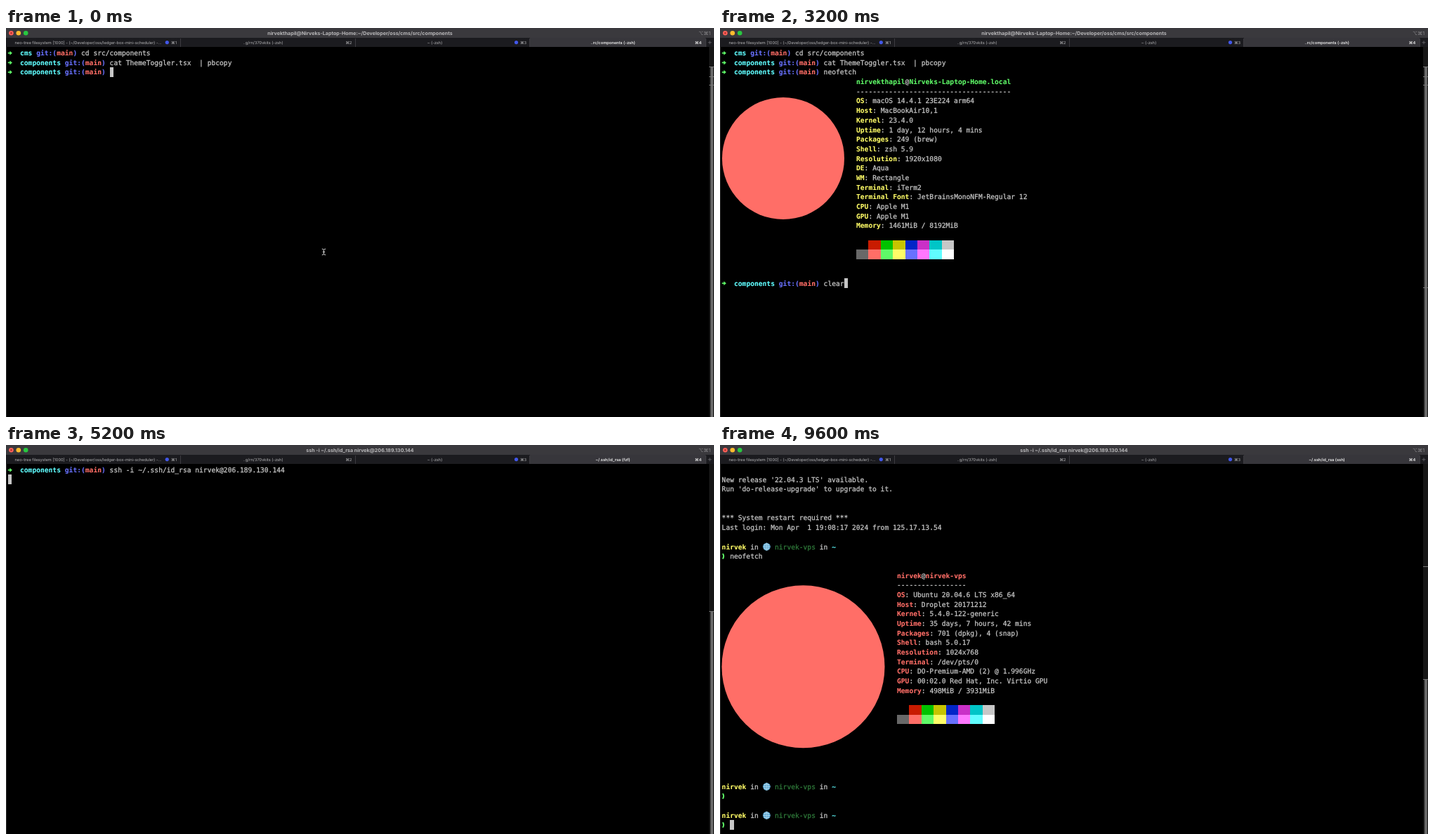
These frames come from a looping animation (1008 px wide and 555 px high, 9800 ms). An HTML page:

```html
<!DOCTYPE html>
<html lang="en">
<head>
<meta charset="utf-8">
<title>Terminal session</title>
<style>
html, body { margin: 0; width: 100%; height: 100%; overflow: hidden; background: #000; }
svg { display: block; width: 100%; height: 100%; }
text { white-space: pre; text-rendering: geometricPrecision; }
rect { shape-rendering: crispEdges; }
.term text { font: 9.634px "DejaVu Sans Mono", monospace; stroke-width: .26; }
.term .b { font-weight: 700; stroke-width: .1; }
.bar text { font: 5.7px Inter, "DejaVu Sans", sans-serif; fill: #b4b4b6; text-anchor: middle; }
.bar .on { font-weight: 600; fill: #f0f0f0; }
.bar .title { font-size: 7.1px; font-weight: 700; fill: #b9b8ba; }
.bar .key { font-size: 7px; fill: #8b8a8d; }
</style>
</head>
<body>
<svg viewBox="0 0 1008 555" preserveAspectRatio="none">
  <rect width="1008" height="555"/>
  <g class="term" id="term"></g>
  <g class="bar" id="bar"></g>
</svg>
<script>
const LOOP = 9800, STEP = 200;
const CW = 5.8, LH = 13.69, LEFT = 2.6, TOP = 28.8;
const FG = "#c7c7c7";

const USER = "nirvek", VPS = USER + "-vps", HOST = "Nirveks-Laptop-Home";
const LOGIN = USER + "thapil@" + HOST;
const IP = "206.189.130.144";
const SSH = `ssh -i ~/.ssh/id_rsa ${USER}@${IP}`;

// Style letters follow "^" in a line; capitals are bold.
const COLORS = {
  w: FG, W: "#ffffff", G: "#5ffa68", Y: "#fffc67", R: "#ff6e67", B: "#6871ff", C: "#60fdff",
  h: "#87af87", H: "#afd7af", i: "#a5a078", d: "#2f7a3a", P: "#d7225f", Q: "#87afd7"
};
const NORMAL = ["#000000", "#c91b00", "#00c200", "#c7c400", "#0225c7", "#ca30c7", "#00c5c7", "#c7c7c7"];
const BRIGHT = ["#686868", "#ff6e67", "#5ffa68", "#fffc67", "#6871ff", "#ff77ff", "#60fdff", "#ffffff"];

const colX = c => LEFT + c * CW;
const rowY = r => TOP + r * LH;
const rect = (x, y, w, h, fill) =>
  `<rect x="${x}" y="${y}" width="${w}" height="${h}" fill="${fill}"/>`;
const circle = (x, y, r, fill) => `<circle cx="${x}" cy="${y}" r="${r}" fill="${fill}"/>`;
const stroke = (d, color, w) => `<path d="${d}" fill="none" stroke="${color}" stroke-width="${w}"/>`;
const label = (x, y, s, cls = "") => `<text x="${x}" y="${y}" class="${cls}">${s}</text>`;
const cells = (c, r, n, fill, rows = 1) => rect(colX(c), rowY(r), n * CW, rows * LH, fill);

const ICONS = {
  "➜": (x, y, color) => stroke(`M${x + .2} ${y + 6.9}h4`, color, 1.7) +
    `<path d="M${x + 2.8} ${y + 3.9}l3.5 3l-3.5 3z" fill="${color}"/>`,
  "❯": (x, y, color) => stroke(`M${x + 1.3} ${y + 3}q2.6 3.7 0 7.5`, color, 1.9),
  "◍": (x, y) => {
    const cx = x + 5.8, cy = y + 6.8;
    return circle(cx, cy, 5.4, "#4d9fce") +
      stroke(`M${cx - 5.2} ${cy}h10.4M${cx} ${cy - 5.2}v10.4M${cx - 4.4} ${cy - 2.8}h8.8M${cx - 4.4} ${cy + 2.8}h8.8`, "#d5ecf6", .6) +
      `<ellipse cx="${cx}" cy="${cy}" rx="2.7" ry="5.2" fill="none" stroke="#d5ecf6" stroke-width=".6"/>`;
  }
};

function drawLine(line, row) {
  let out = "", col = 0;
  const y = rowY(row);
  for (const part of ("^w" + line).split("^").slice(1)) {
    const style = part[0], color = COLORS[style];
    let run = "";
    [...part.slice(1)].forEach((ch, i) => {
      const icon = ICONS[ch];
      if (icon) out += icon(colX(col + i), y, color);
      run += icon ? " " : ch;
    });
    const body = run.trimStart();
    if (body) {
      const x = colX(col + run.length - body.length);
      const bold = style < "a" ? ` class="b"` : "";
      out += `<text x="${x.toFixed(2)}" y="${(y + 10.2).toFixed(2)}" fill="${color}" stroke="${color}"${bold}>${body}</text>`;
    }
    col += run.length;
  }
  return out;
}

const prompt = (cmd, dir = "components") => `^G➜  ^C${dir} ^Bgit:(^Rmain^B)^w ${cmd}`;
const vpsPrompt = cmd => [`^Y${USER}^w in ◍  ^d${VPS}^w in ^C~`, `^G❯^w ${cmd}`];
const typed = (cmd, k, steps) =>
  cmd.slice(0, Math.ceil(Math.max(0, Math.min(1, k / steps)) * cmd.length));
const info = (style, rows) => rows.map(s => s.replace(/^[^:]+/, key => `^${style}${key}^w`));

function palette(col, row) {
  return [NORMAL, BRIGHT].map((set, j) =>
    set.map((fill, i) => cells(col + i * 3, row + j, 3, fill)).join("")).join("");
}

const MAC_INFO = [`^G${LOGIN.replace("@", "^w@^G")}.local`, "-".repeat(38),
  ...info("Y", ["OS: macOS 14.4.1 23E224 arm64", "Host: MacBookAir10,1", "Kernel: 23.4.0",
    "Uptime: 1 day, 12 hours, 4 mins", "Packages: 249 (brew)", "Shell: zsh 5.9",
    "Resolution: 1920x1080", "DE: Aqua", "WM: Rectangle", "Terminal: iTerm2",
    "Terminal Font: JetBrainsMonoNFM-Regular 12", "CPU: Apple M1", "GPU: Apple M1",
    "Memory: 1461MiB / 8192MiB"])];

const VPS_INFO = [`^R${USER}^w@^R${VPS}`, "-".repeat(17),
  ...info("R", ["OS: Ubuntu 20.04.6 LTS x86_64", "Host: Droplet 20171212",
    "Kernel: 5.4.0-122-generic", "Uptime: 35 days, 7 hours, 42 mins",
    "Packages: 701 (dpkg), 4 (snap)", "Shell: bash 5.0.17", "Resolution: 1024x768",
    "Terminal: /dev/pts/0", "CPU: DO-Premium-AMD (2) @ 1.996GHz",
    "GPU: 00:02.0 Red Hat, Inc. Virtio GPU", "Memory: 498MiB / 3931MiB"])];

const stat = (key, val) => `  ${key}:`.padEnd(36) + val;
const WELCOME = ["Welcome to Ubuntu 20.04.6 LTS (GNU/Linux 5.4.0-122-generic x86_64)", "",
  " * Documentation:  https://help.ubuntu.com",
  " * Management:     https://landscape.canonical.com",
  " * Support:        https://ubuntu.com/pro", "",
  "  System information as of Mon Apr  1 23:12:59 UTC 2024", "",
  stat("System load", "0.0"), stat("Usage of /", "10.9% of 77.35GB"),
  stat("Memory usage", "18%"), stat("Swap usage", "0%"), stat("Processes", "140"),
  stat("Users logged in", "0"), stat("IPv4 address for br-1675ef4d2a72", "172.22.0.1"),
  stat("IPv4 address for docker0", "172.17.0.1"), stat("IPv4 address for eth0", IP),
  stat("IPv4 address for eth0", "10.47.0.5"), stat("IPv4 address for eth1", "10.122.0.2"), "",
  "Expanded Security Maintenance for Applications is not enabled.", "",
  "15 updates can be applied immediately.",
  "To see these additional updates run: apt list --upgradable", "",
  "3 additional security updates can be applied with ESM Apps.",
  "Learn more about enabling ESM Apps service at https://ubuntu.com/esm", "",
  "New release '22.04.3 LTS' available.",
  "Run 'do-release-upgrade' to upgrade to it.", "", "",
  "*** System restart required ***",
  "Last login: Mon Apr  1 19:08:17 2024 from 125.17.13.54", ""];

const HISTORY = [
  ` 3996  ssh -i .ssh/id_rsa root@${IP}`,
  ` 4006  ssh -i .ssh/id_rsa ${USER}@${IP}`,
  ` 4007  ssh -i .ssh/id_rsa_vps ${USER}@${IP}`,
  ` 4008  ssh -i .ssh/id_rsa_vps.pub ${USER}@${IP}`,
  ` 4012  rsync --archive --chown=${USER}:${USER} ~/.ssh /home/${USER}`,
  ` 4017  ssh -i .ssh/id_rsa.pub root@${IP}`,
  ` 4350  ssh -i .ssh/id_rsa.pub ${USER}@${IP}`,
  " 4371  ssh .vps",
  ` 4443  ssh -i ~/.ssh/id_rsa.pub ${USER}@${IP}`,
  " 7186  ssh vps",
  " 9546  cd .ssh",
  `10356  ${SSH}`,
  "10412* git config --global gpg.format ssh\\n"];

// Local shell: type neofetch, watch its output, type clear.
function localScene(k) {
  const s = {
    lines: [prompt("cd src/components", "cms"), prompt("cat ThemeToggler.tsx  | pbcopy")],
    thumb: 55, ticks: [55, 69, 81.5], shapes: ""
  };
  const cmd = typed("neofetch", k, 6);
  s.lines.push(prompt(cmd));
  if (k < 7) {
    s.cursor = [25 + cmd.length, 2];
    if (k === 0) s.shapes = stroke("M449.8 315.2q2.7 0 2.7 1.6v5.4q0 1.6-2.7 1.6M455.2 315.2q-2.7 0-2.7 1.6v5.4q0 1.6 2.7 1.6M451 319.5h3", "#d0d0d0", 1);
    return s;
  }
  const shown = [0, 8, 8, 12, 14, 16][Math.min(k - 7, 5)];
  for (const row of MAC_INFO.slice(0, shown)) s.lines.push(" ".repeat(33) + row);
  if (shown) s.shapes += circle(90, 186, 87, COLORS.R);
  if (k < 12) {
    s.title = "neofetch";
    s.tab = k < 10 ? "neofetch (bash)" : "neofetch (osascript)";
    if (!shown) s.cursor = [0, 3];
    return s;
  }
  const clear = typed("clear", k - 12, 4);
  s.shapes += palette(33, 20);
  s.lines[24] = prompt(clear);
  s.cursor = [25 + clear.length, 24];
  s.ticks.push(370);
  return s;
}

// History search after the screen is cleared.
function searchScene(k) {
  const s = { lines: [prompt("")], cursor: [25, 0], thumb: 237, ticks: [237], shapes: "" };
  if (k < 19) return s;
  s.tab = "..rc/components (fzf)";
  if (k > 24) {
    s.lines = [prompt(SSH)];
    s.cursor = [25 + SSH.length, 0];
    return s;
  }
  const query = ["", "ss", "ssh"][Math.min(k - 19, 2)];
  const current = k < 23 ? 12 : 11;
  s.shapes = cells(0, 1, 1, "#262626", 13);
  HISTORY.forEach((entry, i) => {
    const on = i === current, base = on ? "W" : "w";
    if (on) s.shapes += cells(0, i + 1, entry.length + 2, "#303030");
    const text = query ? entry.replace(query, `^${on ? "H" : "h"}${query}^${base}`) : entry;
    s.lines.push(`^P${on ? ">" : " "} ^${base}${text}`);
  });
  s.lines.push(`  ^i${query ? 219 : 4027}/4027 +S`, `^Q> ^W${query}`);
  s.cursor = [2 + query.length, 15];
  s.shapes += rect(84, 226.7, 904, .9, "#55554c") + rect(990.5, rowY(13), .8, LH, "#4a4a4a");
  return s;
}

// Remote shell: login banner, neofetch, and the scroll it causes.
function remoteScene(k) {
  const s = {
    lines: [prompt(SSH)], cursor: [0, 1], thumb: 237, ticks: [237], shapes: "",
    title: SSH, tab: `~/.ssh/id_rsa (${k < 29 ? "fzf" : "ssh"})`
  };
  if (k < 31) return s;
  s.lines.push(...WELCOME);
  if (k < 33) {
    s.cursor = [0, 35];
    return s;
  }
  const cmd = typed("neofetch", k - 34, 3);
  s.lines.push(...vpsPrompt(cmd));
  s.cursor = [2 + cmd.length, 37];
  if (k < 38) return s;
  s.scroll = 1;
  s.cursor = [0, 37];
  if (k < 39) return s;
  s.scroll = k < 40 ? 25 : 28;
  VPS_INFO.forEach((row, i) => s.lines[39 + i] = " ".repeat(43) + row);
  [s.lines[61], s.lines[62]] = vpsPrompt("");
  if (k > 39) [s.lines[64], s.lines[65]] = vpsPrompt("");
  s.cursor = [2, 37];
  s.shapes = circle(118.5, rowY(49 - s.scroll), 116, COLORS.R) + palette(43, 53 - s.scroll);
  s.thumb = 334;
  s.ticks = [173, 334];
  return s;
}

function drawTerm(s) {
  let out = s.shapes;
  const scroll = s.scroll || 0;
  s.lines.forEach((line, i) => {
    if (line && i >= scroll) out += drawLine(line, i - scroll);
  });
  if (s.cursor) out += cells(s.cursor[0], s.cursor[1], 1, FG);
  out += rect(1001, 27, 7, 528, "#161616") + rect(1003, s.thumb, 4, 555 - s.thumb, "#686868");
  for (const y of s.ticks) out += rect(1001, y - .5, 7, 1, "#777");
  return out + rect(0, 27, 1, 528, "#2c2c2c");
}

function drawBar(s) {
  const title = s.title || `${LOGIN}:~/Developer/oss/cms/src/components`;
  const tab = s.tab || "..rc/components (-zsh)";
  let out = rect(0, 0, 1008, 15, "#3a393d") + rect(0, 14, 1008, 13, "#1b1b1f") +
    rect(746, 14, 250, 13, "#37363b");
  ["#ff5f57", "#febc2e", "#28c840"].forEach((c, i) => out += circle(7.4 + i * 10.4, 7.3, 3.3, c));
  out += circle(7.4, 7.3, 1, "#7e1b16");
  for (const x of [248, 497, 745, 996]) out += rect(x, 15, 1, 12, "#3d3c41");
  for (const x of [229.3, 726.5]) out += circle(x, 20.6, 2.6, "#4257e8");
  out += label(504, 9.8, title, "title") + label(994.5, 9.5, "⌥⌘1", "key");
  out += label(117, 22.8, "neo-tree filesystem [1000] - (~/Developer/oss/ledger-box-mini-scheduler) -...");
  out += label(366, 22.8, "..g/rn/370vkits (-zsh)") + label(610.5, 22.8, "~ (-zsh)") + label(864, 22.8, tab, "on");
  [239, 488, 736.5, 985.5].forEach((x, i) => out += label(x, 22.8, "⌘" + (i + 1), i === 3 ? "on" : ""));
  return out + stroke("M999.5 20.7h5M1002 18.2v5", "#77767a", .7);
}

const term = document.getElementById("term"), bar = document.getElementById("bar");
let last = -1;

function render(time) {
  const k = Math.floor((time % LOOP) / STEP);
  if (k === last) return;
  last = k;
  const scene = k < 17 ? localScene(k) : k < 26 ? searchScene(k) : remoteScene(k);
  term.innerHTML = drawTerm(scene);
  bar.innerHTML = drawBar(scene);
}

const start = performance.now();
function tick() {
  render(performance.now() - start);
  requestAnimationFrame(tick);
}
tick();
</script>
</body>
</html>
```
